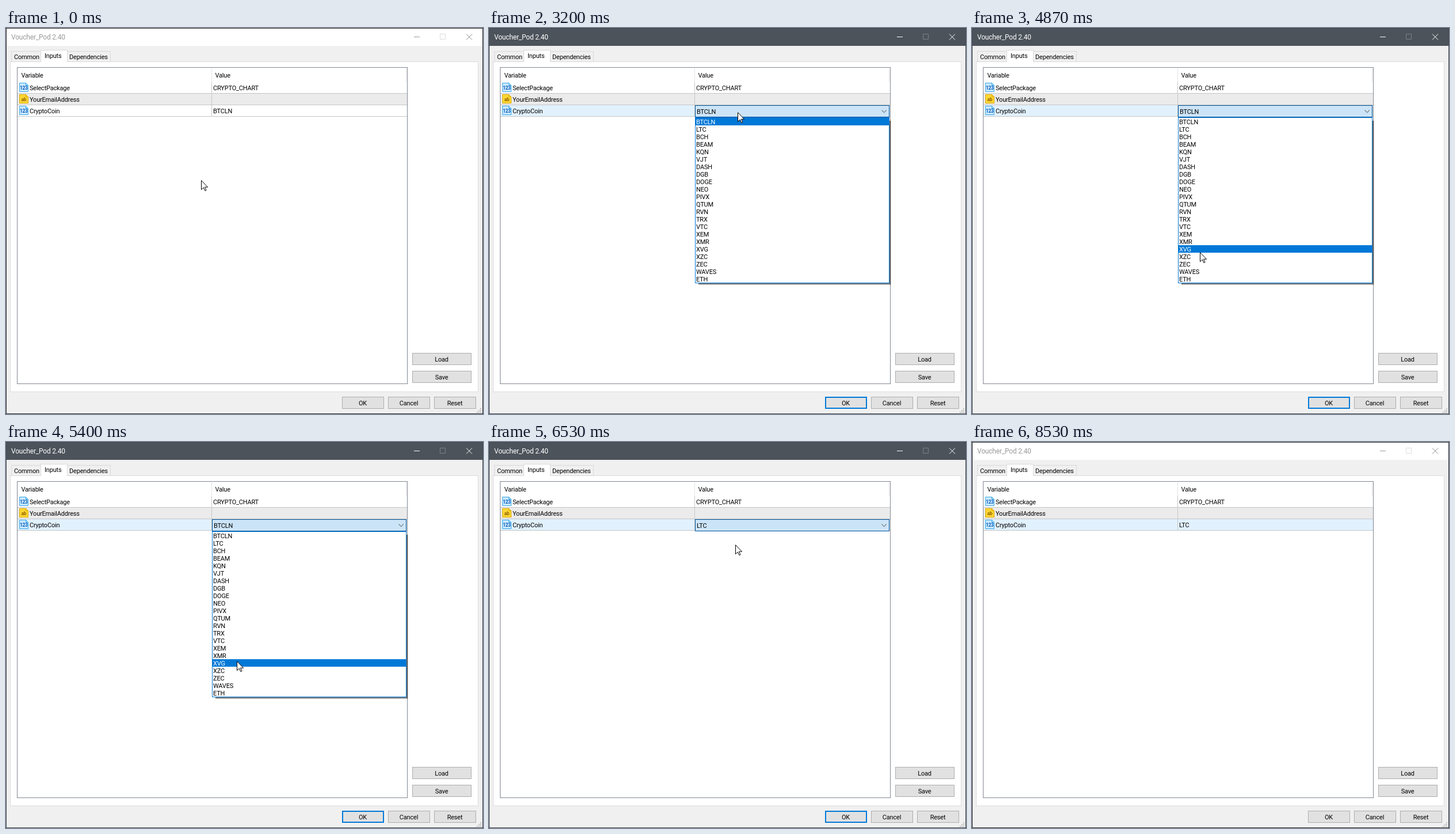
Animation of 829 by 670 pixels, one loop 8.67 s. Source, as an HTML page:

```html
<!DOCTYPE html>
<html lang="en">
<head>
<meta charset="utf-8">
<title>Input settings</title>
<style>
html, body { margin: 0; width: 100%; height: 100%; overflow: hidden; background: #f0f0f0; }
svg { display: block; width: 829px; height: 670px; }
text { font: 11px Roboto, "Noto Sans", sans-serif; letter-spacing: -0.2px; fill: #000; white-space: pre; }
.title { font-size: 12px; }
.icon { font-weight: 700; font-size: 8.5px; letter-spacing: -0.3px; }
.mid { text-anchor: middle; }
</style>
</head>
<body>
<svg id="stage" viewBox="0 0 829 670"></svg>
<script>
const LOOP = 8670;
const TICK = 200 / 3;
const FOCUS = 1670, EDIT = 2400, DROP = 3070, PICK = 6530, BLUR = 8530;
const ROW_H = 13, LIST_TOP = 156;
const COINS = ("BTCLN LTC BCH BEAM KQN VJT DASH DGB DOGE NEO PIVX QTUM " +
  "RVN TRX VTC XEM XMR XVG XZC ZEC WAVES ETH").split(" ");

const stage = document.getElementById("stage");

function set(node, attrs) {
  for (const k in attrs) node.setAttribute(k, attrs[k]);
  return node;
}
function add(tag, attrs, parent = stage) {
  const node = document.createElementNS("http://www.w3.org/2000/svg", tag);
  parent.appendChild(set(node, attrs));
  return node;
}
const fillRect = (x, y, width, height, fill, parent) =>
  add("rect", { x, y, width, height, fill }, parent);
const box = (x, y, w, h, fill, stroke, parent) =>
  add("rect", { x: x + .5, y: y + .5, width: w - 1, height: h - 1, fill, stroke }, parent);
const line = (d, stroke, parent) => add("path", { d, stroke, fill: "none" }, parent);
function label(x, y, str, cls = "", parent) {
  const node = add("text", { x, y, class: cls }, parent);
  node.textContent = str;
  return node;
}
const show = (node, on) => node.setAttribute("visibility", on ? "visible" : "hidden");

// Window frame and title bar
fillRect(0, 0, 829, 670, "#f0f0f0");
const bar = fillRect(0, 0, 829, 31, "#fff");
const title = label(9, 20, "Voucher_Pod 2.40", "title");
const minBtn = line("M709 15.5h10", "#999");
const maxBtn = line("M754.5 10.5h9v9h-9z", "#ddd");
const closeBtn = line("M800 10.5l10 10M810 10.5l-10 10", "#888");
const frame = box(0, 0, 829, 670, "none", "#2a2a2a");

// Tabs and page
box(7, 58, 814, 574, "#fff", "#dcdcdc");
box(9, 40, 53, 19, "#f0f0f0", "#d9d9d9");
box(106, 40, 76, 19, "#f0f0f0", "#d9d9d9");
box(60, 38, 47, 21, "#fff", "#d9d9d9");
fillRect(61, 57, 45, 3, "#fff");
label(14, 54, "Common");
label(67, 52, "Inputs");
label(110, 54, "Dependencies");

// Table
box(19, 68, 679, 550, "#fff", "#828790");
line("M357.5 70V94M695.5 70V94", "#e3e3e3");
label(26.5, 86, "Variable");
label(363.5, 86, "Value");
fillRect(20, 114, 677, 19, "#ebebeb");
const rowMark = fillRect(20, 134, 677, 19, "#e1f1fe");
line("M20 113.5H697M20 133.5H697M20 153.5H697M357.5 94V154", "#c6c6c6");

function icon(y, str, fill, edge, ink) {
  add("path", { d: `M23.5 ${y + .5}h11l4 4v11h-15z`, fill, stroke: edge });
  line(`M34.5 ${y + .5}v4h4`, edge);
  add("text", { x: 30.8, y: y + 11.5, class: "icon mid", style: `fill:${ink}` }).textContent = str;
}
["SelectPackage", "YourEmailAddress", "CryptoCoin"].forEach((name, i) => {
  const y = 95 + 20 * i;
  if (i === 1) icon(y, "ab", "#fdd835", "#dba800", "#966500");
  else icon(y, "123", "#c9e8fc", "#39a9ea", "#0d5fbd");
  label(41, y + 13, name);
});
label(360, 108, "CRYPTO_CHART");
const plain = label(360, 148, "BTCLN");

// Buttons
function button(x, y, w, str) {
  const face = box(x, y, w, 21, "#e1e1e1", "#adadad");
  label(x + w / 2 - .5, y + 15, str, "mid");
  return face;
}
button(706, 564, 103, "Load");
button(706, 595, 103, "Save");
button(584, 640, 73, "OK");
button(664, 640, 73, "Cancel");
button(744, 640, 73, "Reset");
const okRing = add("rect", { x: 585, y: 641, width: 71, height: 19, fill: "none", stroke: "#0078d7", "stroke-width": 2 });
for (let r = 0; r < 3; r++)
  for (let c = 2 - r; c < 3; c++) fillRect(818 + 3 * c, 660 + 3 * r, 2, 2, "#bfbfbf");

// Combo box
const combo = add("g", {});
const face = box(358, 134, 338, 21, "#e5f1fb", "#0078d7", combo);
line("M682.5 142.5l4.2 4.2 4.2-4.2", "#404040", combo);
const comboText = label(361, 149, "BTCLN", "", combo);

// Drop-down list
const clip = add("clipPath", { id: "reveal" });
const clipBox = fillRect(350, 155, 360, 300, "#000", clip);
const list = add("g", { "clip-path": "url(#reveal)" });
for (let i = 1; i <= 3; i++)
  add("path", { d: `M364 ${443 + i}H${696 + i}V161H690V440H364z`, fill: "#000", opacity: .24 }, list);
box(358, 155, 338, 288, "#fff", "#0078d7", list);
const hover = fillRect(359, LIST_TOP, 336, ROW_H, "#0078d7", list);
const items = COINS.map((coin, i) => label(360, LIST_TOP + 11 + ROW_H * i, coin, "", list));

const cursor = add("path", {
  d: "M.5.7V16.6L4.3 13 6.9 18.6 9 17.6 6.5 12.2H11.6Z", fill: "#fff", stroke: "#000"
});

// Pointer path: time, x, y, easing of the stretch that ends here
const PATH = [
  [0, 339, 264], [330, 342, 265], [670, 342, 265], [733, 343, 265], [800, 343, 265],
  [1267, 438, 134, "both"], [1400, 438, 134], [1600, 426, 147], [1867, 426, 147],
  [2000, 432, 146], [3600, 432, 146], [4467, 391, 257, "in"], [4533, 392, 275],
  [5000, 397, 435], [5400, 401, 380], [6267, 428, 178, "both"], [6533, 428, 178],
  [7333, 171, 575, "in"], [7400, 120, 606], [7467, 100, 620], [7533, 130, 637],
  [7600, 209, 652], [7667, 240, 690], [LOOP, 240, 690]
];
const EASE = { in: u => u * u, both: u => u * u * (3 - 2 * u), none: u => u };

function pointer(t) {
  let i = 1;
  while (i < PATH.length - 1 && PATH[i][0] < t) i++;
  const [t0, x0, y0] = PATH[i - 1];
  const [t1, x1, y1, ease = "none"] = PATH[i];
  const u = EASE[ease](Math.max(0, Math.min(1, (t - t0) / (t1 - t0))));
  return [Math.round(x0 + (x1 - x0) * u), Math.round(y0 + (y1 - y0) * u)];
}

function mix(a, b, u) {
  return `rgb(${a.map((v, i) => Math.round(v + (b[i] - v) * u))})`;
}

function drawWindow(active) {
  set(bar, { fill: active ? "#4c535b" : "#fff" });
  set(frame, { stroke: active ? "#3f464d" : "#2a2a2a" });
  title.style.fill = active ? "#fff" : "#999";
  set(minBtn, { stroke: active ? "#fff" : "#999" });
  set(maxBtn, { stroke: active ? "#7b8187" : "#ddd" });
  set(closeBtn, { stroke: active ? "#fff" : "#888" });
  show(okRing, active);
}

function drawCombo(t, q) {
  const editing = t >= EDIT && t < BLUR;
  const coin = t >= PICK ? "LTC" : "BTCLN";
  show(rowMark, t >= EDIT);
  show(plain, !editing);
  show(combo, editing);
  plain.textContent = comboText.textContent = coin;
  if (t < DROP) return set(face, { fill: "#e5f1fb", stroke: "#0078d7" });
  const fade = Math.max(0, Math.min(1, (q - 6533) / 333));
  set(face, {
    fill: mix([204, 228, 247], [225, 225, 225], fade),
    stroke: mix([0, 84, 153], [173, 173, 173], fade)
  });
}

function drawList(t, q, y) {
  const open = t >= DROP && t < PICK;
  show(list, open);
  if (!open) return;
  set(clipBox, { height: Math.min(1, (q - 3000) / 200) * 292 });
  const index = Math.max(0, Math.min(COINS.length - 1, Math.floor((y - LIST_TOP) / ROW_H)));
  set(hover, { y: LIST_TOP + ROW_H * index });
  items.forEach((item, i) => { item.style.fill = i === index ? "#fff" : "#000"; });
}

function draw(t) {
  const q = Math.floor((t + 4) / TICK) * TICK;
  const [x, y] = pointer(q);
  drawWindow(t >= FOCUS && t < BLUR);
  drawCombo(t, q);
  drawList(t, q, y);
  set(cursor, { transform: `translate(${x} ${y})` });
}

const start = performance.now();
function frameLoop() {
  draw((performance.now() - start) % LOOP);
  requestAnimationFrame(frameLoop);
}
frameLoop();
</script>
</body>
</html>
```
